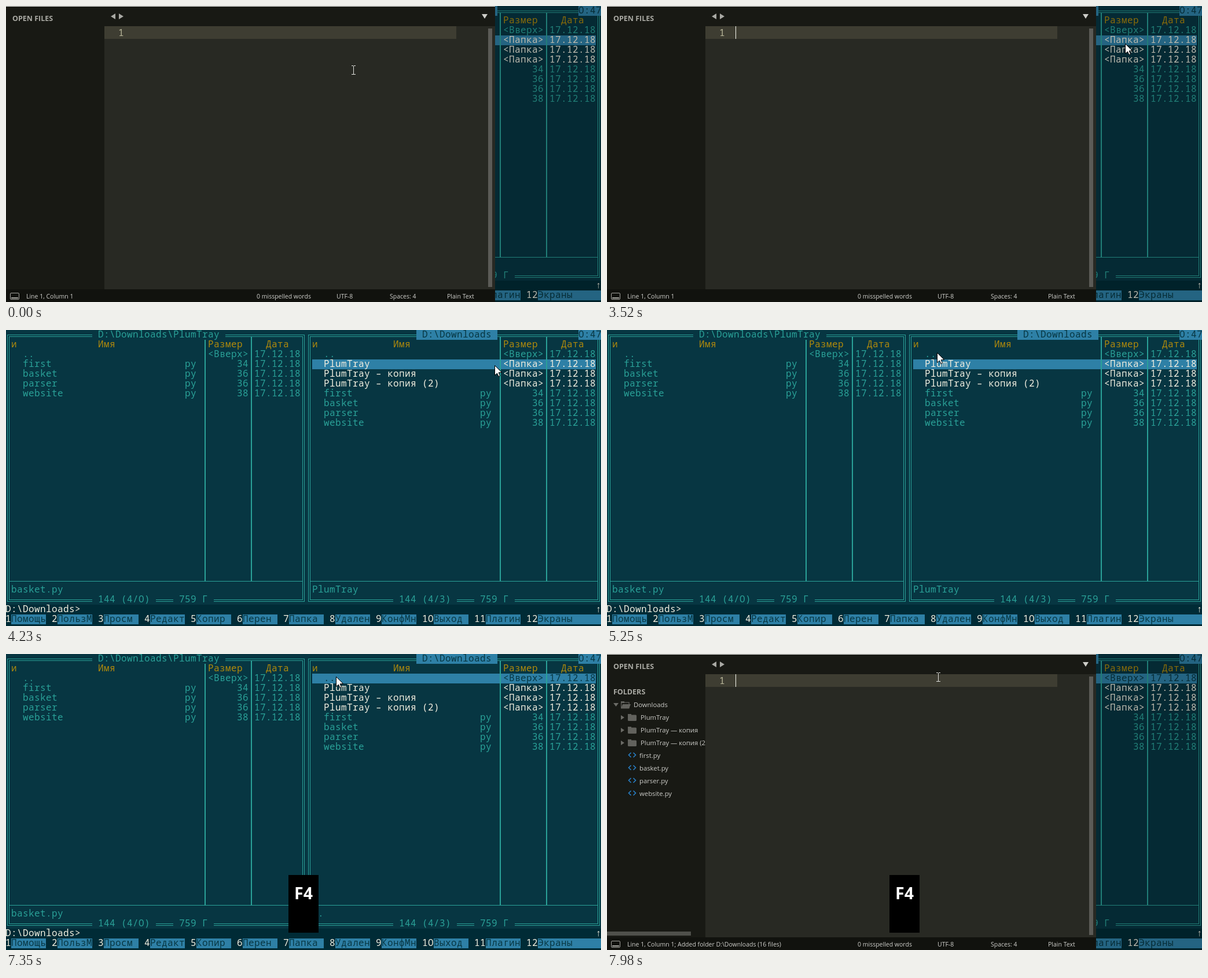
An HTML page with a canvas that plays this animation: 1028 by 513 pixels, repeating every 8000 ms.

```html
<!DOCTYPE html>
<html lang="ru">
<head>
<meta charset="utf-8">
<title>Editor and file panels</title>
<style>
html, body { margin: 0; width: 100%; height: 100%; overflow: hidden; background: #073642; }
canvas { display: block; }
</style>
</head>
<body>
<canvas id="stage" width="1028" height="513"></canvas>
<script>
const ctx = document.getElementById('stage').getContext('2d');
const LOOP = 8000, STEP = 78;

const MONO = '16px "Noto Sans Mono", "DejaVu Sans Mono", monospace';
const UI = '"Open Sans", "Noto Sans", sans-serif';

const BG = '#073642', DEEP = '#002b36', TEAL = '#2aa198', GOLD = '#b08a0c',
      BLUE = '#2e80a6', WHITE = '#f3efe0';

const FOLDER = 'PlumTray';
const FOLDERS = [FOLDER, FOLDER + ' — копия', FOLDER + ' — копия (2)'];
const FILES = [['first', 34], ['basket', 36], ['parser', 36], ['website', 38]];
const KEYS = ['Помощь', 'ПользМ', 'Просм', 'Редакт', 'Копир', 'Перен',
              'Папка', 'Удален', 'КонфМн', 'Выход', 'Плагин', 'Экраны'];

function rect(x, y, w, h, color) {
  ctx.fillStyle = color;
  ctx.fillRect(x, y, w, h);
}

function poly(points, color) {
  ctx.beginPath();
  points.forEach(([x, y]) => ctx.lineTo(x, y));
  ctx.closePath();
  ctx.fillStyle = color;
  ctx.fill();
}

function label(s, x, y, size, color, weight = 400) {
  ctx.font = `${weight} ${size}px ${UI}`;
  ctx.letterSpacing = '0px';
  ctx.fillStyle = color;
  ctx.fillText(s, x, y);
}

// Console cells are 10 by 17 pixels; zeros have no inner mark.
const cellX = col => col * 10 - 1;

function put(s, col, row, color) {
  ctx.font = MONO;
  ctx.letterSpacing = '0.4px';
  ctx.fillStyle = color;
  ctx.fillText(String(s).replace(/0/g, 'O'), cellX(col), row * 17 + 13);
}

function fillCells(col, row, n, color) {
  rect(cellX(col), row * 17, n * 10, 17, color);
}

function panelFrame(col, title, active, total) {
  const x = cellX(col);
  ctx.strokeStyle = TEAL;
  ctx.lineWidth = 1;
  ctx.strokeRect(x + 3.5, 8.5, 513 - (col ? 10 : 0), 462);
  ctx.strokeRect(x + 6.5, 11.5, 507 - (col ? 10 : 0), 456);
  rect(x + 7, 435, col ? 496 : 506, 1, TEAL);
  const size = col ? 86 : 35, date = col ? 94 : 43;
  for (const c of [size, date]) rect(cellX(c) - 6, 12, 2, 423, TEAL);

  const at = col ? 71 : 15;
  fillCells(at, 0, title.length + 2, active ? BLUE : BG);
  put(title, at + 1, 0, active ? BG : TEAL);

  put('и', col + 1, 1, GOLD);
  put('Имя', col ? 67 : 16, 1, GOLD);
  put('Размер', size, 1, GOLD);
  put('Дата', date + 2, 1, GOLD);

  fillCells(col + 15, 27, 11, BG);
  put(total, col + 16, 27, TEAL);
  fillCells(col + 29, 27, 7, BG);
  put('759 Г', col + 30, 27, TEAL);
}

function entry(col, row, name, size, color, ext) {
  const right = col ? 93 : 42, date = right + 1;
  put(name, col + 3, row, color);
  if (ext) put(ext, right - 11, row, color);
  put(size, right - String(size).length, row, color);
  put('17.12.18', date, row, color);
}

function selectRow(row) {
  fillCells(53, row, 49, BLUE);
  for (const c of [86, 94]) rect(cellX(c) - 6, row * 17, 2, 17, TEAL);
}

function drawPanels(t) {
  const up = t >= 5480;
  rect(0, 0, 1028, 513, BG);
  rect(0, 476, 1028, 37, DEEP);

  panelFrame(0, 'D:\\Downloads\\' + FOLDER, false, '144 (4/0)');
  panelFrame(52, 'D:\\Downloads', true, '144 (4/3)');
  fillCells(99, 0, 4, BLUE);
  put('0:47', 99, 0, BG);

  entry(0, 2, '..', '<Вверх>', TEAL);
  FILES.forEach(([n, s], i) => entry(0, 3 + i, n, s, TEAL, 'py'));
  put('basket.py', 1, 26, TEAL);

  selectRow(up ? 2 : 3);
  entry(52, 2, '..', '<Вверх>', up ? BG : TEAL);
  FOLDERS.forEach((n, i) => entry(52, 3 + i, n.replace('—', '–'), '<Папка>', WHITE));
  FILES.forEach(([n, s], i) => entry(52, 6 + i, n, s, TEAL, 'py'));
  put(up ? '..' : FOLDER, 53, 26, TEAL);

  put('D:\\Downloads>', 0, 28, WHITE);
  put('↑', 102, 28, WHITE);
  KEYS.forEach((name, i) => {
    const col = i < 10 ? i * 8 : 72 + (i - 9) * 9;
    const start = col + (i < 9 ? 1 : 2);
    put(i + 1, col, 29, WHITE);
    fillCells(start, 29, i === 11 ? 11 : 6, BLUE);
    put(name, start, 29, BG);
  });
}

function drawPrompt(t) {
  if (t < 3690) {
    ctx.strokeStyle = WHITE;
    ctx.lineWidth = 1;
    ctx.strokeRect(129.5, 476.5, 9, 16);
  } else if (t < 7350 && Math.floor((t - 5250) / 545) & 1) {
    rect(129, 476, 2, 17, WHITE);
  }
}

function folderIcon(x, y, open) {
  const c = '#62625d';
  rect(x, y, 6, 3, c);
  if (!open) {
    ctx.beginPath();
    ctx.roundRect(x, y + 1.5, 15, 10.5, 1.5);
    ctx.fillStyle = c;
    ctx.fill();
    return;
  }
  ctx.strokeStyle = c;
  ctx.lineWidth = 1.2;
  ctx.strokeRect(x + .6, y + 2, 13.5, 9.5);
  poly([[x + 3, y + 5], [x + 17, y + 5], [x + 14, y + 12.5], [x, y + 12.5]], c);
}

function codeIcon(x, y) {
  ctx.strokeStyle = '#2980c8';
  ctx.lineWidth = 1.6;
  for (const d of [-1, 1]) {
    ctx.beginPath();
    ctx.moveTo(x + d * 2, y - 4);
    ctx.lineTo(x + d * 6, y);
    ctx.lineTo(x + d * 2, y + 4);
    ctx.stroke();
  }
}

function drawTree() {
  const ink = '#cbcbc7', mark = '#6b6b66', size = 11.3;
  ctx.save();
  ctx.beginPath();
  ctx.rect(0, 0, 170, 491);
  ctx.clip();
  label('FOLDERS', 11, 70, 12.5, '#a9a9a3', 700);
  poly([[11, 85], [20, 85], [15.5, 91]], mark);
  folderIcon(24, 82, true);
  label('Downloads', 46, 92, size, ink);
  FOLDERS.forEach((name, i) => {
    const y = 110 + i * 22;
    poly([[24, y - 4], [30, y], [24, y + 4]], mark);
    folderIcon(36, y - 6, false);
    label(name, 58, y + 4, size, ink);
  });
  FILES.forEach(([name], i) => {
    const y = 176 + i * 22;
    codeIcon(43.5, y - 1);
    label(name + '.py', 56, y + 4, size, ink);
  });
  rect(0, 481, 145, 7, '#4f504b');
  ctx.restore();
}

// Blinking text caret with a short fade at both ends.
function caretAlpha(t) {
  if (t >= 7600) return t < 7830 ? 0 : t < 7980 ? .6 : 1;
  const p = t % 1043;
  if (p < 310) return 0;
  if (p < 380) return .5;
  if (p < 700) return 1;
  if (p < 780) return .65;
  return p < 860 ? .3 : 0;
}

function drawEditor(t) {
  const dark = '#181914', ink = '#cfcfcb', loaded = t >= 7680;
  rect(0, 0, 845, 513, dark);
  rect(170, 35, 675, 456, '#282923');
  rect(170, 35, 608, 22, '#3e3d32');
  rect(833, 39, 7, 448, '#5b5b57');
  rect(0, 491, 845, 22, '#11120e');
  rect(0, 0, 845, 1, '#e4e4e2');

  label('OPEN FILES', 11, 26, 12.5, '#a9a9a3', 700);
  poly([[181, 18], [189, 13], [189, 23]], '#a9a9a4');
  poly([[203, 18], [195, 13], [195, 23]], '#a9a9a4');
  poly([[822, 14], [832, 14], [827, 22]], '#cdcdc8');
  put('1', 19.5, 2.29, '#b9b79a');
  if (loaded) drawTree();

  ctx.globalAlpha = caretAlpha(t);
  rect(222, 35, 1, 22, '#f8f8f0');
  ctx.globalAlpha = 1;

  ctx.strokeStyle = '#a5a5a0';
  ctx.lineWidth = 1;
  ctx.beginPath();
  ctx.roundRect(7.5, 497.5, 15, 11, 1.5);
  ctx.stroke();
  rect(9, 505, 12, 2, '#a5a5a0');

  const status = 'Line 1, Column 1' + (loaded ? '; Added folder D:\\Downloads (16 files)' : '');
  [[status, 35], ['0 misspelled words', 433], ['UTF-8', 571], ['Spaces: 4', 663], ['Plain Text', 762]]
    .forEach(([s, x]) => label(s, x, 507, 10.5, ink));
}

// Pointer legs: start time, number of steps, end point.
const LEGS = [
  [1252, 8, 426, 92],
  [2110, 10, 895, 77],
  [2892, 4, 895, 65],
  [3992, 12, 570, 39]
];

function pointerAt(t) {
  let x = 600, y = 111;
  for (const [start, steps, toX, toY] of LEGS) {
    if (t < start) break;
    const p = Math.min(1, Math.floor((t - start) / STEP) / steps);
    const e = p * p * (3 - 2 * p);
    x += (toX - x) * e;
    y += (toY - y) * e;
  }
  return [Math.round(x), Math.round(y)];
}

function drawPointer(t, editor) {
  const [x, y] = pointerAt(t);
  if (editor && x < 845) {
    const c = '#e2e2de', bx = x + (t > 7000 ? 2 : 0), by = y + (t > 7000 ? 1 : 0);
    rect(bx, by - 7, 1, 15, c);
    for (const dy of [-8, 7]) {
      rect(bx - 3, by + dy, 3, 1, c);
      rect(bx + 1, by + dy, 3, 1, c);
    }
    return;
  }
  const shape = [[0, 0], [0, 17], [4, 13.5], [6.5, 19], [9, 18], [6.7, 12.3], [12, 12]]
    .map(([a, b]) => [x + .5 + a, y + .5 + b]);
  poly(shape, '#fff');
  ctx.strokeStyle = '#000';
  ctx.lineWidth = 1;
  ctx.stroke();
}

function draw(t) {
  const editor = t < 3600 || t >= 7600;
  drawPanels(t);
  if (t < 3690 || t >= 7600) rect(0, 0, 1028, 513, 'rgba(0,0,0,.22)');
  if (editor) drawEditor(t);
  else drawPrompt(t);
  if (t >= 7270) {
    rect(488, 383, 52, 100, '#000');
    label('F4', 498, 425, 28.5, '#fff', 700);
  }
  drawPointer(t, editor);
}

const began = performance.now();
function tick() {
  draw((performance.now() - began) % LOOP);
  requestAnimationFrame(tick);
}
tick();
</script>
</body>
</html>
```
